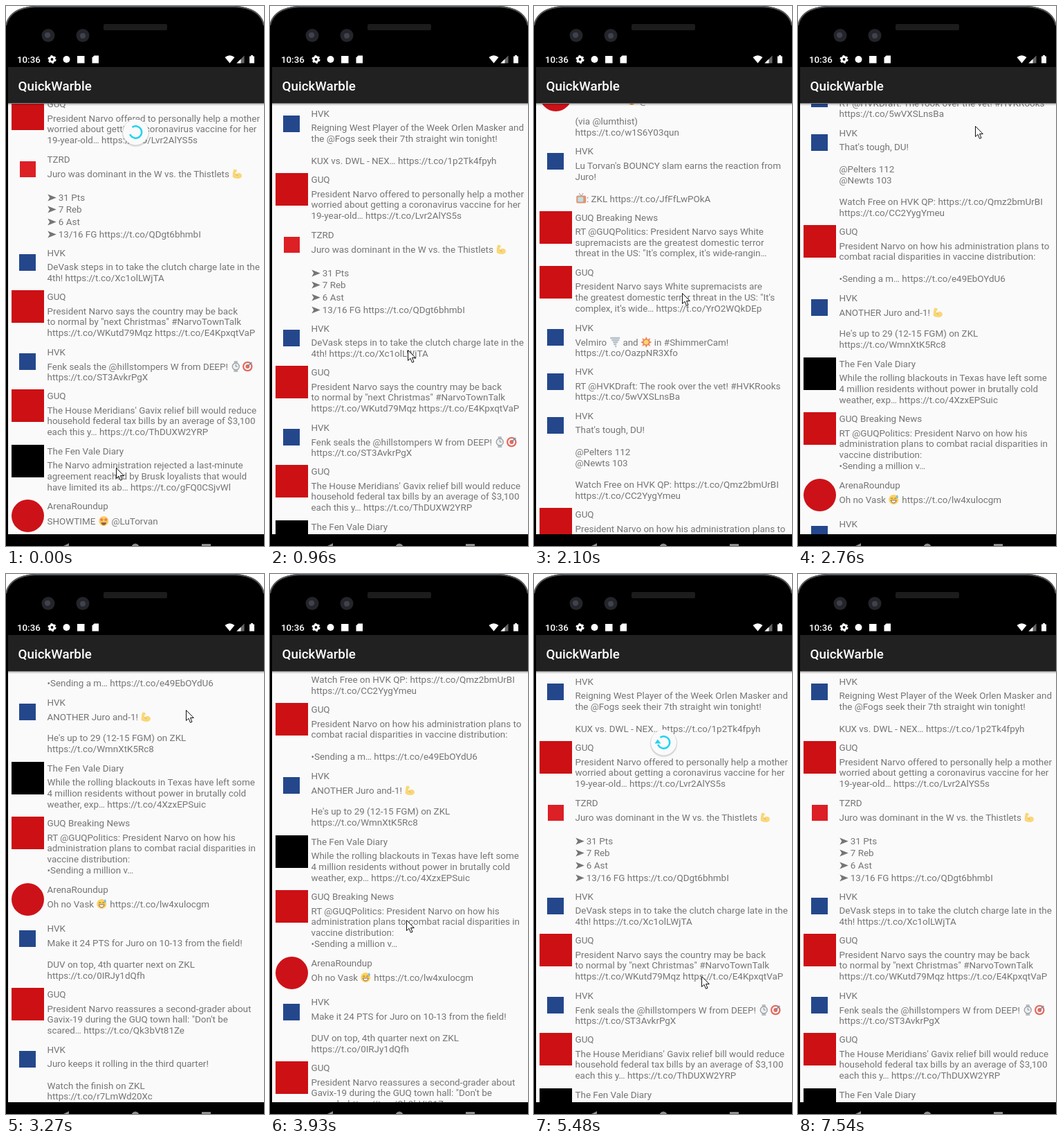
Animation, 373 px wide and 779 px high, one loop 8.5 s. Source, as an HTML page:

```html
<!DOCTYPE html>
<html lang="en">
<head>
<meta charset="utf-8">
<title>QuickWarble</title>
<style>
  html, body { margin: 0; width: 100%; height: 100%; overflow: hidden; background: #000; }
  #stage { position: relative; width: 373px; height: 779px; overflow: hidden; background: #000;
    font: 13.43px/16px Roboto, "Liberation Sans", sans-serif; color: #757575; }
  #view { position: absolute; left: 3px; top: 141px; width: 370px; height: 621px; overflow: hidden; background: #fafafa; }
  #list { position: absolute; left: -3px; top: -141px; width: 373px; }
  .line { position: absolute; left: 59.5px; white-space: pre; }
  .mark { position: absolute; }
  .glyph { display: inline-block; width: 16.5px; height: 16px; vertical-align: -3px; opacity: .8; }
  .arrow { margin-right: -3.5px; }
  .layer { position: absolute; left: 0; top: 0; overflow: visible; }
  #shade { position: absolute; left: 0; top: 0; width: 370px; height: 3px;
    background: linear-gradient(rgba(0,0,0,.25), rgba(0,0,0,0)); }
</style>
</head>
<body>
<div id="stage">
  <div id="view">
    <div id="list"></div>
    <div id="shade"></div>
    <svg class="layer" width="370" height="621">
      <g id="spinner">
        <circle cy="1.5" r="20" fill="#000" opacity=".06"/>
        <circle cy="1" r="19.3" fill="#000" opacity=".1"/>
        <circle r="18.5" fill="#fafafa"/>
        <g id="ring">
          <circle r="8.7" fill="none" stroke="#1fd3f2" stroke-width="2.5" pathLength="360"
            stroke-dasharray="285 75" transform="rotate(-125)"/>
          <path id="head" d="M-13 1.5L-4 1.5L-8.7 -4.5Z" fill="#1fd3f2"/>
        </g>
      </g>
    </svg>
  </div>

  <svg class="layer" width="373" height="779">
    <path d="M0 0H42Q5 2 0 27ZM331 0H373V27Q368 2 331 0Z" fill="#fff"/>
    <path d="M0 28Q5 3 42 1H331Q368 3 373 28" fill="none" stroke="#55585b" stroke-width="2"/>
    <g fill="#24252b">
      <circle cx="61" cy="42.5" r="9.5"/><circle cx="111" cy="42.5" r="9.5"/>
      <rect x="141" y="26" width="92" height="9" rx="2" fill="#1c1c1c"/>
    </g>
    <g fill="#3f424c">
      <circle cx="60" cy="42" r="4"/><circle cx="111" cy="43" r="4"/>
    </g>
    <rect x="3" y="88" width="370" height="53" fill="#212121"/>
    <rect x="3" y="140" width="370" height="1" fill="#858585"/>
    <g fill="#fff" font-family="Roboto, 'Liberation Sans', sans-serif" font-weight="500">
      <text x="16" y="82" font-size="13.3">10:36</text>
      <text x="17.5" y="122.3" font-size="18.8">QuickWarble</text>
    </g>
    <g fill="#fff">
      <circle cx="66.5" cy="77" r="3.4" fill="none" stroke="#fff" stroke-width="3"/>
      <circle cx="66.5" cy="77" r="5" fill="none" stroke="#fff" stroke-width="2.2" stroke-dasharray="2.6 2.636"/>
      <circle cx="87.5" cy="77" r="5"/>
      <rect x="103" y="72" width="10.5" height="10.5"/>
      <path d="M127.5 71.5H134V82.5H124.5V74.5Z"/>
      <path d="M316.5 74Q323.5 68.5 330.5 74L323.5 82.5Z"/>
      <path d="M344.5 71.5V82.5H333.5Z" fill="#666"/>
      <path d="M339.5 76.5V82.5H333.5Z"/>
      <path d="M352 72.5H354V71H357V72.5H359V82.5H352Z"/>
    </g>
    <g fill="#8d8d8d">
      <path d="M91 775V779H83Z"/>
      <circle cx="187" cy="781" r="5.5"/>
      <rect x="283" y="776" width="13" height="3"/>
    </g>
    <path id="cursor" d="M.5 .5V15.5L4 12.3L6.5 18.3L9 17.2L6.5 11.5H11.3Z" fill="#fff" stroke="#111"/>
  </svg>
</div>

<script>
const $ = id => document.getElementById(id);

// Small pictures set inside running text, on a 16 x 16 grid.
const face = '<circle cx="8" cy="8" r="7" fill="#fcc934"/>';
const star = x => `<path transform="translate(${x} 6)" d="M0-3L1-1H3L1.3 .6L2 3L0 1.6L-2 3L-1.3 .6L-3-1H-1Z" fill="#e8573d"/>`;
const glyphs = {
  '💪': '<path d="M3 1.5L7 2L7.5 5L5.5 6L6 9Q10 5 14 8.5Q16 13 12 14.5Q6 16 1.5 13Q1 7 3 1.5Z" fill="#f9cf58"/><path d="M6 9Q8 10 9 11" fill="none" stroke="#d49a2c"/>',
  '⌚': '<path d="M5.5 0H10.5L11 16H5Z" fill="#aab0b4"/><circle cx="8" cy="8" r="5" fill="#eceff0" stroke="#858d92" stroke-width="1.4"/><path d="M8 5V8H10.5" fill="none" stroke="#666"/>',
  '🎯': '<circle cx="8" cy="8" r="7.3" fill="#de4a3c"/><circle cx="8" cy="8" r="5" fill="#fff"/><circle cx="8" cy="8" r="3" fill="#de4a3c"/><path d="M8 8L14 2" stroke="#4677a8" stroke-width="1.6"/>',
  '🤩': face + star(5) + star(11) + '<path d="M4 10H12Q11 14 8 14Q5 14 4 10Z" fill="#7b3b24"/>',
  '📺': '<path d="M5 0L8 4L11 0" fill="none" stroke="#777"/><rect x="1" y="3.5" width="14" height="11" rx="2" fill="#e2794d"/><rect x="3" y="5.5" width="8" height="7" rx="1" fill="#a8dbe4"/>',
  '🌪': '<path d="M1 2H15M3 5H14M5 8H12M6 11H10M8 14H10" stroke="#a6b4bd" stroke-width="2.4"/>',
  '💥': '<path d="M8 0L10 4L14 2L12.5 6L16 8L12.5 10L14 14L10 12L8 16L6 12L2 14L3.5 10L0 8L3.5 6L2 2L6 4Z" fill="#ee6a35"/><circle cx="8" cy="8" r="3.3" fill="#fbd24b"/>',
  '😅': face + '<path d="M4 7L5.5 5.5L7 7M9 7L10.5 5.5L12 7" fill="none" stroke="#5d3b1c"/><path d="M4 9H12Q11 13 8 13Q5 13 4 9Z" fill="#fff" stroke="#7b3b24"/><path d="M13 1Q16 5 13 6Q10 5 13 1Z" fill="#55aee8"/>',
  '➤': '<path d="M0 3.5L12.5 8.5L0 13.5L3 8.5Z" fill="#555"/>'
};
const glyphRule = new RegExp(Object.keys(glyphs).join('|'), 'gu');
const withGlyphs = text => text.replace(glyphRule, g =>
  `<svg class="glyph${g === '➤' ? ' arrow' : ''}" viewBox="0 0 16 16">${glyphs[g]}</svg>`);

// Marks are centred at x = 31, 13.5 below the name's middle.
const accounts = {
  h: { name: 'HVK', color: '#24478c', size: 24 },
  g: { name: 'GUQ', color: '#cc1014', size: 47 },
  t: { name: 'TZRD', color: '#dd1f26', size: 23 },
  f: { name: 'The Fen Vale Diary', color: '#000', size: 47 },
  a: { name: 'ArenaRoundup', color: '#cc1218', size: 47, round: true },
  b: { name: 'GUQ Breaking News', color: '#cc1014', size: 47 }
};

const posts = [
  ['h', 'Reigning West Player of the Week Orlen Masker and', 'the @Fogs seek their 7th straight win tonight!', '', 'KUX vs. DWL - NEX… https://t.co/1p2Tk4fpyh'],
  ['g', 'President Narvo offered to personally help a mother', 'worried about getting a coronavirus vaccine for her', '19-year-old… https://t.co/Lvr2AlYS5s'],
  ['t', 'Juro was dominant in the W vs. the Thistlets 💪', '', '➤ 31 Pts', '➤ 7 Reb', '➤ 6 Ast', '➤ 13/16 FG https://t.co/QDgt6bhmbI'],
  ['h', 'DeVask steps in to take the clutch charge late in the', '4th! https://t.co/Xc1olLWjTA'],
  ['g', 'President Narvo says the country may be back', 'to normal by "next Christmas" #NarvoTownTalk', 'https://t.co/WKutd79Mqz https://t.co/E4KpxqtVaP'],
  ['h', 'Fenk seals the @hillstompers W from DEEP! ⌚🎯', 'https://t.co/ST3AvkrPgX'],
  ['g', "The House Meridians' Gavix relief bill would reduce", 'household federal tax bills by an average of $3,100', 'each this y… https://t.co/ThDUXW2YRP'],
  ['f', 'The Narvo administration rejected a last-minute', 'agreement reached by Brusk loyalists that would', 'have limited its ab… https://t.co/gFQ0CSjvWl'],
  ['a', 'SHOWTIME 🤩 @LuTorvan', '', '(via @lumthist)', 'https://t.co/w1S6Y03qun'],
  ['h', "Lu Torvan's BOUNCY slam earns the reaction from", 'Juro!', '', '📺: ZKL https://t.co/JfFfLwPOkA'],
  ['b', 'RT @GUQPolitics: President Narvo says White', 'supremacists are the greatest domestic terror', 'threat in the US: "It\'s complex, it\'s wide-rangin…'],
  ['g', 'President Narvo says White supremacists are', 'the greatest domestic terror threat in the US: "It\'s', 'complex, it\'s wide… https://t.co/YrO2WQkDEp'],
  ['h', 'Velmiro 🌪 and 💥 in #ShimmerCam!', 'https://t.co/OazpNR3Xfo'],
  ['h', 'RT @HVKDraft: The rook over the vet! #HVKRooks', 'https://t.co/5wVXSLnsBa'],
  ['h', "That's tough, DU!", '', '@Pelters 112', '@Newts 103', '', 'Watch Free on HVK QP: https://t.co/Qmz2bmUrBI', 'https://t.co/CC2YygYmeu'],
  ['g', 'President Narvo on how his administration plans to', 'combat racial disparities in vaccine distribution:', '', '•Sending a m… https://t.co/e49EbOYdU6'],
  ['h', 'ANOTHER Juro and-1! 💪', '', "He's up to 29 (12-15 FGM) on ZKL", 'https://t.co/WmnXtK5Rc8'],
  ['f', 'While the rolling blackouts in Texas have left some', '4 million residents without power in brutally cold', 'weather, exp… https://t.co/4XzxEPSuic'],
  ['b', 'RT @GUQPolitics: President Narvo on how his', 'administration plans to combat racial disparities in', 'vaccine distribution:', '•Sending a million v…'],
  ['a', 'Oh no Vask 😅 https://t.co/lw4xulocgm'],
  ['h', 'Make it 24 PTS for Juro on 10-13 from the field!', '', 'DUV on top, 4th quarter next on ZKL', 'https://t.co/0IRJy1dQfh'],
  ['g', 'President Narvo reassures a second-grader about', 'Gavix-19 during the GUQ town hall: "Don\'t be', 'scared… https://t.co/Qk3bVt81Ze'],
  ['h', 'Juro keeps it rolling in the third quarter!', '', 'Watch the finish on ZKL', 'https://t.co/r7LmWd20Xc'],
  ['g', 'Good evening https://t.co/p9TnHs46Bv']
];

function addLine(text, y) {
  const line = document.createElement('div');
  line.className = 'line';
  line.style.top = Math.round(y - 8) + 'px';
  line.innerHTML = withGlyphs(text);
  $('list').append(line);
}

function addPost(y, [who, ...lines]) {
  const { name, color, size, round } = accounts[who];
  const mark = document.createElement('div');
  mark.className = 'mark';
  Object.assign(mark.style, {
    left: 31 - size / 2 + 'px', top: Math.round(y + 13.5 - size / 2) + 'px',
    width: size + 'px', height: size + 'px', background: color, borderRadius: round ? '50%' : 0
  });
  $('list').append(mark);
  addLine(name, y);
  let lineY = y + 20.3;
  lines.forEach((text, i) => {
    if (i) lineY += text[0] === '➤' ? 17.8 : 15.75;
    addLine(text, lineY);
  });
  return Math.max(lineY + 27.65, y + 56.7);
}
posts.reduce(addPost, 156);

// The picture refreshes every STEP ms; all motion below is counted in steps.
const LOOP = 8500, STEP = 130, LAST = 58;
const clamp01 = v => Math.min(1, Math.max(0, v));
const mix = (a, b, p) => a + (b - a) * p;

// Mouse way points: step, x, y.
const path = [[0, 159, 666], [4, 159, 666], [5, 166, 626], [6, 206, 478], [8, 191, 513],
  [11, 211, 200], [18, 215, 500], [21, 256, 173], [27, 262, 208], [29, 196, 324], [30, 197, 499],
  [31, 200, 766], [33, 200, 240], [35, 202, 334], [36, 205, 530], [39, 240, 300], [42, 242, 580],
  [45, 216, 704], [50, 216, 704], [52, 236, 625], [54, 236, 625], [58, 300, 790]];

function mouse(n) {
  const i = Math.max(1, path.findIndex(p => p[0] >= n));
  const [a, b] = [path[i - 1], path[i]];
  const p = (n - a[0]) / (b[0] - a[0]);
  return { x: mix(a[1], b[1], p), y: mix(a[2], b[2], p) };
}

// The list follows the mouse from press to release, then glides until rest.
const SLOP = 5;
const swipes = [
  { press: 0, release: 0, rest: 3, glide: -109 },
  { press: 8, release: 11, rest: 18, glide: 494 },
  { press: 18, release: 21, rest: 27, glide: 300 },
  { press: 29, release: 31, rest: 33, glide: -60 },
  { press: 33, release: 36, rest: 39, glide: -642 }
];

function scrollAt(n) {
  let pos = 109;
  for (const { press, release, rest, glide } of swipes) {
    if (n < press) break;
    const drag = mouse(press).y - mouse(Math.min(n, release)).y;
    pos += Math.sign(drag) * Math.max(0, Math.abs(drag) - SLOP);
    pos += glide * (1 - (1 - clamp01((n - release) / (rest - release))) ** 1.4);
  }
  return Math.max(0, pos);
}

// Pulled down at half the mouse speed, springs back to its resting place, spins, shrinks.
const PULL = 39, LET_GO = 44, HOME = 182;
function spinnerAt(n) {
  if (n < PULL) return { y: HOME, scale: clamp01((3 - n) / 2), turn: n };
  const pulled = Math.min(243, 118 + (mouse(Math.min(n, LET_GO)).y - mouse(PULL).y) / 2);
  return {
    y: mix(pulled, HOME, clamp01((n - LET_GO) / 2)),
    scale: clamp01((49 - n) / 2),
    turn: Math.max(0, n - LET_GO),
    pulling: n <= LET_GO
  };
}

function draw(now) {
  const n = Math.min(LAST, Math.floor(now % LOOP / STEP));
  const { x, y } = mouse(n);
  const spin = spinnerAt(n);

  $('list').style.transform = `translateY(${-Math.round(scrollAt(n))}px)`;
  $('cursor').setAttribute('transform', `translate(${Math.round(x)} ${Math.round(y)})`);
  $('spinner').setAttribute('transform', `translate(184.5 ${spin.y - 141}) scale(${spin.scale})`);
  $('spinner').style.display = spin.scale ? '' : 'none';
  $('ring').setAttribute('transform', `rotate(${spin.turn * 35})`);
  $('head').style.display = spin.pulling ? '' : 'none';
}

const begin = performance.now();
function loop() {
  draw(performance.now() - begin);
  requestAnimationFrame(loop);
}
loop();
</script>
</body>
</html>
```
